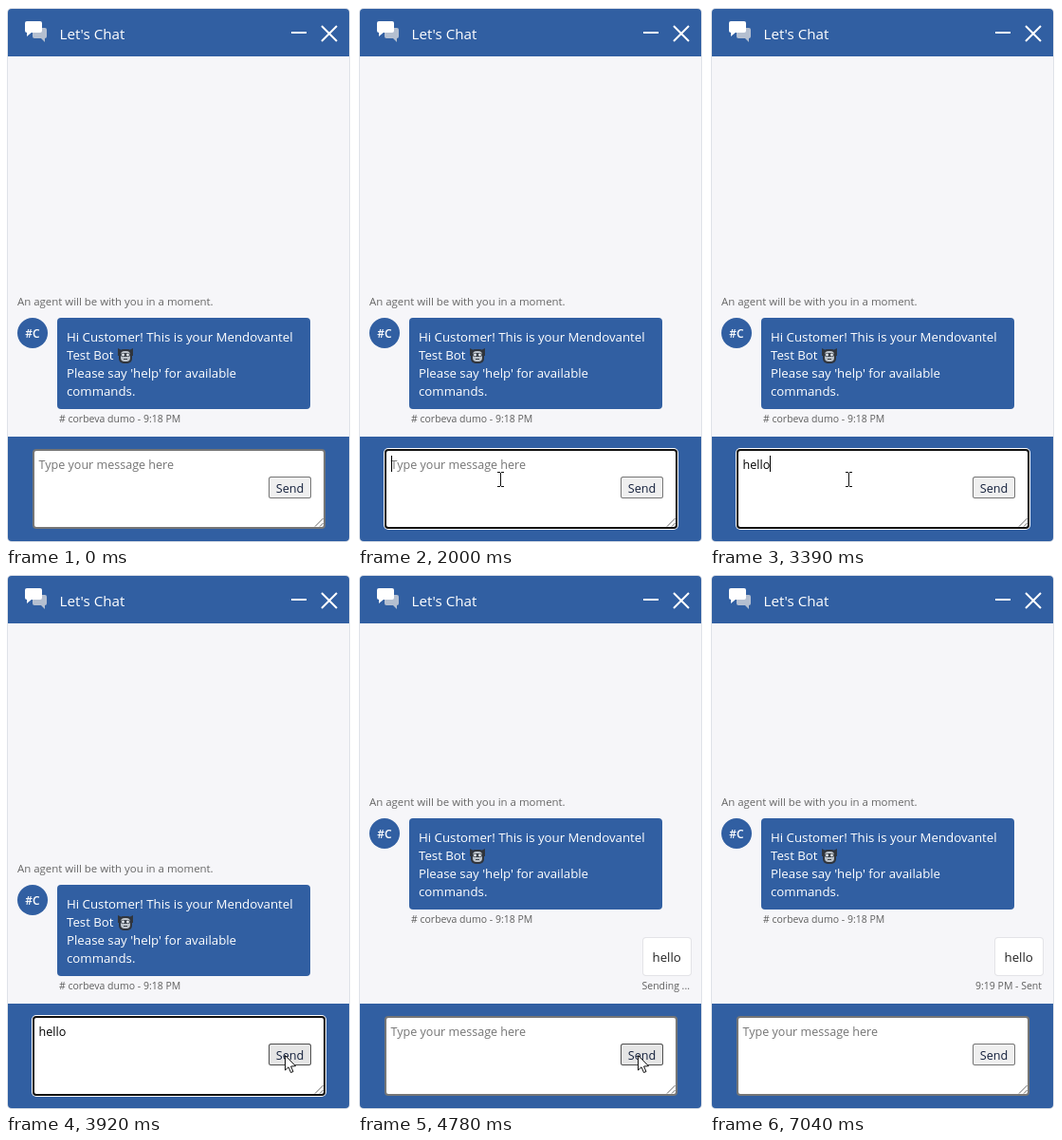
Write an HTML page with a canvas that moves like this. It is 365 px wide and 567 px high and loops after 7.91 s.

```html
<!DOCTYPE html>
<html lang="en">
<head>
<meta charset="utf-8">
<title>Chat widget</title>
<style>
  html, body { margin: 0; width: 100%; height: 100%; overflow: hidden; background: #fff; }
  canvas { display: block; }
</style>
</head>
<body>
<canvas id="stage" width="365" height="567"></canvas>
<script>
const ctx = document.getElementById('stage').getContext('2d');
const LOOP = 7910;
const BLUE = '#315fa2';
const FOCUS = 930, PRESS = 4720, POST = 4780, SENT = 5180, LEAVE = 7040;
const KEY_TIMES = [2190, 2460, 2860, 3120, 3390];
const MESSAGE = 'hello';
const BUTTON = { x: 277, y: 495, w: 45, h: 23 };
const FIELD = { x: 28, y: 466, w: 309, h: 84 };

// start, end, steps, from x, from y, to x, to y, ease-out power
const MOVES = [
  [70, 270, 4, 203, 528, 155.5, 505, 2],
  [410, 470, 2, 154, 503, 151, 500, 1],
  [740, 930, 3, 151, 499, 150, 497.5, 1],
  [2460, 2590, 2, 145, 498, 146, 498, 1],
  [3590, 4050, 8, 158, 499, 295, 508, 4],
  [6450, 7040, 10, 296, 511, 313, 562, 1]
];

function box(x, y, w, h, r, fill) {
  ctx.beginPath();
  ctx.roundRect(x, y, w, h, r);
  ctx.fillStyle = fill;
  ctx.fill();
}

function disc(x, y, r, fill) {
  ctx.beginPath();
  ctx.arc(x, y, r, 0, Math.PI * 2);
  ctx.fillStyle = fill;
  ctx.fill();
}

function poly(points, fill) {
  ctx.beginPath();
  points.forEach(([x, y]) => ctx.lineTo(x, y));
  ctx.closePath();
  ctx.fillStyle = fill;
  ctx.fill();
}

function lines(segments, color, width) {
  ctx.beginPath();
  for (const [x1, y1, x2, y2] of segments) {
    ctx.moveTo(x1, y1);
    ctx.lineTo(x2, y2);
  }
  ctx.strokeStyle = color;
  ctx.lineWidth = width;
  ctx.stroke();
}

function setFont(size, weight = 400) {
  ctx.font = `${weight} ${size}px "Open Sans", "Noto Sans", sans-serif`;
}

function text(str, x, y, size, color, align = 'left', weight = 400) {
  setFont(size, weight);
  ctx.textAlign = align;
  ctx.fillStyle = color;
  ctx.fillText(str, x, y);
}

const inside = (p, r) => p && p.x >= r.x && p.x < r.x + r.w && p.y >= r.y && p.y < r.y + r.h;

function pointerAt(t) {
  const move = MOVES.filter(m => t >= m[0]).pop();
  if (!move || t >= LEAVE) return null;
  const [start, end, steps, x0, y0, x1, y1, power] = move;
  const step = Math.floor((t - start) / (end - start) * (steps - 1) + 1e-6);
  const u = Math.min(1, step / (steps - 1));
  const k = 1 - (1 - u) ** power;
  return { x: x0 + (x1 - x0) * k, y: y0 + (y1 - y0) * k };
}

function drawFrame() {
  ctx.fillStyle = '#fff';
  ctx.fillRect(0, 0, 365, 567);
  box(1, 2, 362, 562, 5, '#dfe2e8');
  box(2, 3, 360, 560, 4, BLUE);
  ctx.fillStyle = '#f6f6f9';
  ctx.fillRect(2, 53, 360, 400);

  box(28, 23, 15, 11, 2, '#b4bfd0');
  poly([[36, 33], [41, 33], [41, 38]], '#b4bfd0');
  box(20, 16, 18, 12, 2, '#fff');
  poly([[22, 27], [28, 27], [22, 32]], '#fff');

  text("Let's Chat", 56.5, 35, 15.2, '#fff');
  lines([[301, 28, 317, 28]], '#fff', 2);
  lines([[333, 21, 349, 37], [349, 21, 333, 37]], '#fff', 2);
}

function drawBotFace(x, y) {
  poly([[x, y + 1], [x + 4, y + 3], [x + 12, y + 3], [x + 16, y + 1], [x + 16, y + 9], [x, y + 9]], '#30353d');
  box(x + 1, y + 2, 14, 15, 5, '#30353d');
  box(x + 3, y + 4, 10, 11, 4, '#bcc3ca');
  box(x + 3, y + 6, 10, 4, 2, '#3c434c');
  disc(x + 5.5, y + 8, 1.4, '#e8edf2');
  disc(x + 10.5, y + 8, 1.4, '#e8edf2');
  ctx.fillStyle = '#3c434c';
  ctx.fillRect(x + 6, y + 12, 4, 1);
}

function drawMessages(t) {
  const posted = t >= POST;
  ctx.save();
  if (posted) ctx.translate(0, -70);
  text('An agent will be with you in a moment.', 12, 315, 11.45, '#666');
  disc(28, 344, 16, BLUE);
  text('#C', 28, 348.5, 12, '#fff', 'center', 600);
  box(54, 328, 267, 96, 4, BLUE);
  [
    'Hi Customer! This is your Mendovantel',
    'Test Bot',
    "Please say 'help' for available",
    'commands.'
  ].forEach((line, i) => text(line, 64, 353 + i * 19, 13.25, '#fff'));
  drawBotFace(118, 359);
  text('# corbeva dumo - 9:18 PM', 56, 438, 10.5, '#5f5f5f');
  ctx.restore();

  if (posted) {
    box(300, 383, 52, 41, 4, '#e3e3e7');
    box(301, 384, 50, 39, 3, '#fff');
    text(MESSAGE, 310.5, 409, 13.25, '#222');
    text(t < SENT ? 'Sending ...' : '9:19 PM - Sent', 350, 438, 10.5, '#5f5f5f', 'right');
  }
}

function drawField(t) {
  const focused = t >= FOCUS && t < PRESS;
  const { x, y, w, h } = FIELD;
  if (focused) box(x - 1, y - 1, w + 2, h + 2, 5, '#fff');
  box(x, y, w, h, 4, focused ? '#101010' : '#767676');
  box(x + 2, y + 2, w - 4, h - 4, 2, '#fff');
  lines([[326, 547.5, 334.5, 539], [331, 547.5, 334.5, 544]], '#666', 1);

  const typed = t < POST ? MESSAGE.slice(0, KEY_TIMES.filter(k => t >= k).length) : '';
  if (typed) text(typed, 34.5, 487, 12.6, '#000');
  else text('Type your message here', 34.5, 487, 12.55, '#757575');

  // The caret restarts its blink with every key
  const lastKey = KEY_TIMES.filter(k => t >= k).pop() || FOCUS + 10;
  const blinkOn = Math.floor(Math.max(0, t - lastKey) / 530) % 2 === 0;
  if (focused && blinkOn) {
    setFont(12.6);
    const caretX = Math.max(35, Math.floor(34.6 + ctx.measureText(typed).width));
    ctx.fillStyle = '#000';
    ctx.fillRect(caretX, 473, 1, 17);
  }
}

function drawButton(t, hover) {
  const { x, y, w, h } = BUTTON;
  const pressed = t >= PRESS && t < POST;
  const border = pressed ? '#8d8d8d' : hover ? '#4f4f4f' : '#767676';
  const face = pressed ? '#f5f5f5' : hover ? '#e5e5e5' : '#efefef';
  box(x, y, w, h, 2.5, border);
  box(x + 1, y + 1, w - 2, h - 2, 1.5, face);
  text('Send', x + w / 2, 512, 12.6, '#14203c', 'center');
}

function drawPointer(p) {
  if (inside(p, FIELD) && !inside(p, BUTTON)) {
    const x = Math.floor(p.x) + 0.5, y = Math.round(p.y);
    lines([
      [x, y - 7, x, y + 7],
      [x - 3.5, y - 7.5, x - 0.5, y - 7.5], [x + 0.5, y - 7.5, x + 3.5, y - 7.5],
      [x - 3.5, y + 7.5, x - 0.5, y + 7.5], [x + 0.5, y + 7.5, x + 3.5, y + 7.5]
    ], '#111', 1);
    return;
  }
  ctx.save();
  ctx.translate(Math.round(p.x) + 0.5, Math.round(p.y) - 0.5);
  poly([[0, 0], [0, 15.5], [3.5, 12.3], [6, 18], [8.5, 17], [6, 11.5], [11, 11.2]], '#fff');
  ctx.strokeStyle = '#111';
  ctx.lineWidth = 1;
  ctx.stroke();
  ctx.restore();
}

function render() {
  const t = performance.now() % LOOP;
  const pointer = pointerAt(t);
  drawFrame();
  drawMessages(t);
  drawField(t);
  drawButton(t, inside(pointer, BUTTON));
  const glow = 'rgba(255, 242, 0, 0.7)';
  if (t >= FOCUS && t < 1070) disc(147, 495, 11.5, glow);
  if (t >= PRESS && t < POST) disc(294.5, 507.5, 11.5, glow);
  if (pointer) drawPointer(pointer);
  requestAnimationFrame(render);
}
render();
</script>
</body>
</html>
```
